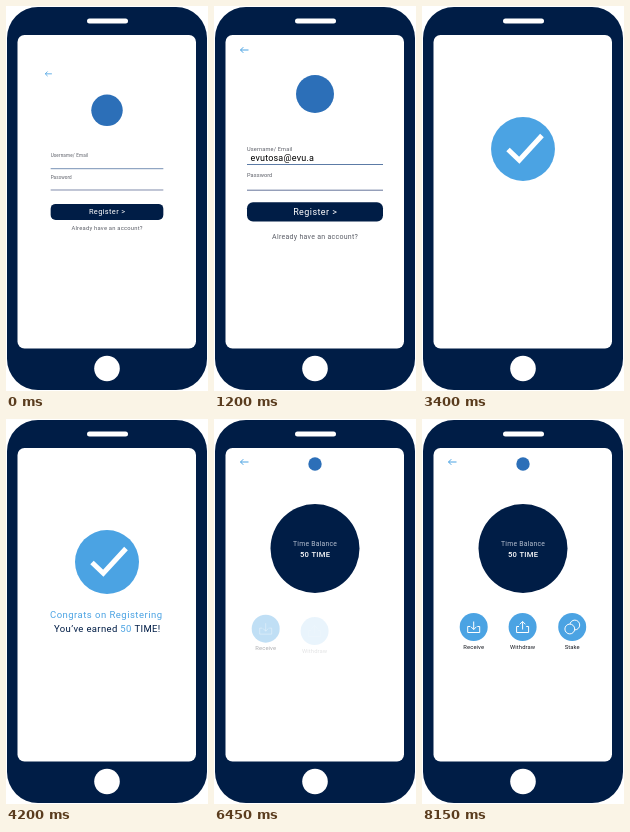
Write an HTML page with a canvas that moves like this. It is 202x385 px and loops after 9100 ms.

```html
<!DOCTYPE html>
<html lang="en">
<head>
<meta charset="utf-8">
<title>Register and earn</title>
<style>
html, body { margin: 0; width: 100%; height: 100%; overflow: hidden; background: #fff; }
canvas { display: block; width: 202px; height: 385px; }
</style>
</head>
<body>
<canvas id="stage"></canvas>
<script>
const W = 202, H = 385, LOOP = 9100, STEP = 50;
const NAVY = '#001d46', BLUE = '#4ba3e3', LOGO = '#2c6fb8', GREY = '#5a5d66';
const EMAIL = 'evutosa@evu.app';

const canvas = document.getElementById('stage');
const ctx = canvas.getContext('2d');
const ratio = window.devicePixelRatio || 1;
canvas.width = W * ratio;
canvas.height = H * ratio;

const clamp = v => Math.min(1, Math.max(0, v));
const easeOut = p => 1 - (1 - p) ** 3;
const popScale = ms => easeOut(clamp(ms / 450));

function box(x, y, w, h, r, color) {
  ctx.fillStyle = color;
  ctx.beginPath();
  ctx.roundRect(x, y, w, h, r);
  ctx.fill();
}

function disc(x, y, r, color) {
  ctx.fillStyle = color;
  ctx.beginPath();
  ctx.arc(x, y, r, 0, Math.PI * 2);
  ctx.fill();
}

function path(points, color, width) {
  ctx.strokeStyle = color;
  ctx.lineWidth = width;
  ctx.beginPath();
  points.forEach(([x, y]) => ctx.lineTo(x, y));
  ctx.stroke();
}

// Returns the x where the text ends.
function text(str, x, y, size, color, spacing = 0, weight = 400) {
  ctx.font = `${weight} ${size}px Roboto, "Open Sans", sans-serif`;
  ctx.letterSpacing = spacing + 'px';
  ctx.fillStyle = color;
  ctx.fillText(str, x, y);
  return x + ctx.measureText(str).width;
}

function centered(str, y, size, color, spacing, weight = 400, cx = 101) {
  ctx.textAlign = 'center';
  text(str, cx + spacing / 2, y, size, color, spacing, weight);
  ctx.textAlign = 'left';
}

function scaled(cx, cy, s, draw) {
  if (s <= 0) return;
  ctx.save();
  ctx.translate(cx, cy);
  ctx.scale(s, s);
  ctx.translate(-cx, -cy);
  draw();
  ctx.restore();
}

function faded(alpha, dy, draw) {
  if (alpha <= 0) return;
  ctx.save();
  ctx.globalAlpha = alpha;
  ctx.translate(0, dy);
  draw();
  ctx.restore();
}

function backArrow(y) {
  path([[34.5, y], [26.5, y]], BLUE, 1);
  path([[29.3, y - 2.8], [26.5, y], [29.3, y + 2.8]], BLUE, 1);
}

function phone() {
  box(1, 1, 200, 383, 31, NAVY);
  box(11.5, 29, 178.5, 313.5, 7, '#fff');
  box(81, 12.5, 41, 5, 2.5, '#fff');
  disc(101, 362.5, 12.8, '#fff');
}

function emailCount(t) {
  if (t >= 1350) return EMAIL.length;
  return t < 450 ? 0 : Math.min(13, 1 + Math.floor((t - 450) / 62.5));
}

function starCount(t) {
  return t < 1600 ? 0 : Math.min(10, 1 + Math.floor((t - 1600) / 122));
}

function login(t) {
  const s = popScale(t + 200);
  scaled(101, 183, s, () => {
    backArrow(44);
    disc(101, 88, 19, LOGO);
    text('Username/ Email', 33, 144.5, 5.6, GREY, 0.17);
    text('Password', 33, 170.5, 5.6, GREY, 0.08);
    path([[33, 158.5], [169, 158.5]], '#5c7ba6', 1);
    path([[33, 184.2], [169, 184.2]], '#66749a', 1);
    centered('Already have an account?', 233, 7, GREY, 0.28);
  });
  scaled(101, 206, s, () => {
    box(33, 196.2, 136, 19.4, 6, NAVY);
    centered('Register >', 209, 9, '#fff', 0.42);
  });
  text(EMAIL.slice(0, emailCount(t)), 36.5, 155, 9, '#000', 0.2);
  text('*'.repeat(starCount(t)), 36.7, 185, 9, '#000', 0.25, 700);
}

function congrats(t) {
  scaled(101, 143, popScale(t - 3000), () => {
    disc(101, 143, 32, BLUE);
    path([[86, 143.5], [97.3, 154.3], [120, 129.5]], '#fff', 5);
  });
  const p = clamp((t - 3700) / 500);
  faded(p, -5 * (1 - easeOut(p)), () => {
    centered('Congrats on Registering', 198.5, 9.5, BLUE, 0.48, 400, 100);
    let x = text('You\u2019ve earned ', 48, 213.3, 9.5, NAVY, 0.36);
    x = text('50 ', x, 213.3, 9.5, BLUE, 0.36);
    text('TIME!', x, 213.3, 9.5, NAVY, 0.36);
  });
}

function trayIcon(x, up) {
  const tip = up ? 202.5 : 210.5, back = up ? 2.8 : -2.8;
  path([[x - 3.6, 207.5], [x - 6, 207.5], [x - 6, 213.5],
        [x + 6, 213.5], [x + 6, 207.5], [x + 3.6, 207.5]], '#fff', 1);
  path([[x, 202.5], [x, 210.5]], '#fff', 1);
  path([[x - 2.8, tip + back], [x, tip], [x + 2.8, tip + back]], '#fff', 1);
}

function ring(x, y, r) {
  disc(x, y, r, BLUE);
  ctx.strokeStyle = '#fff';
  ctx.lineWidth = 1;
  ctx.stroke();
}

const actions = [
  ['Receive', 51.7, x => trayIcon(x, false)],
  ['Withdraw', 100.6, x => trayIcon(x, true)],
  ['Stake', 150.2, x => { ring(x + 2.6, 206, 4.9); ring(x - 2.4, 210, 4.9); }]
];

function rise(t, start, draw) {
  const p = clamp((t - start) / 400);
  faded(p, 6 * (1 - easeOut(p)), draw);
}

function dashboard(t) {
  rise(t, 6000, () => {
    backArrow(43);
    disc(101, 45, 6.7, LOGO);
  });
  rise(t, 6020, () => disc(101, 129.5, 44.5, NAVY));
  rise(t, 6050, () => {
    centered('Time Balance', 126.5, 6.8, '#b4bfd0', 0.25);
    centered('50 TIME', 138, 7.6, '#fff', 0.3, 500);
  });
  actions.forEach(([label, x, icon], i) => rise(t, 6310 + i * 92, () => {
    disc(x, 208, 14, BLUE);
    icon(x);
    centered(label, 229.7, 5.8, '#14171f', 0.12, 400, x);
  }));
}

function draw(t) {
  ctx.setTransform(ratio, 0, 0, ratio, 0, 0);
  ctx.fillStyle = '#fff';
  ctx.fillRect(0, 0, W, H);
  phone();
  if (t < 3050) login(t);
  else if (t < 6000) congrats(t);
  else dashboard(t);
}

const begin = performance.now();
function tick() {
  const t = (performance.now() - begin) % LOOP;
  draw(Math.floor(t / STEP) * STEP);
  requestAnimationFrame(tick);
}
tick();
</script>
</body>
</html>
```
